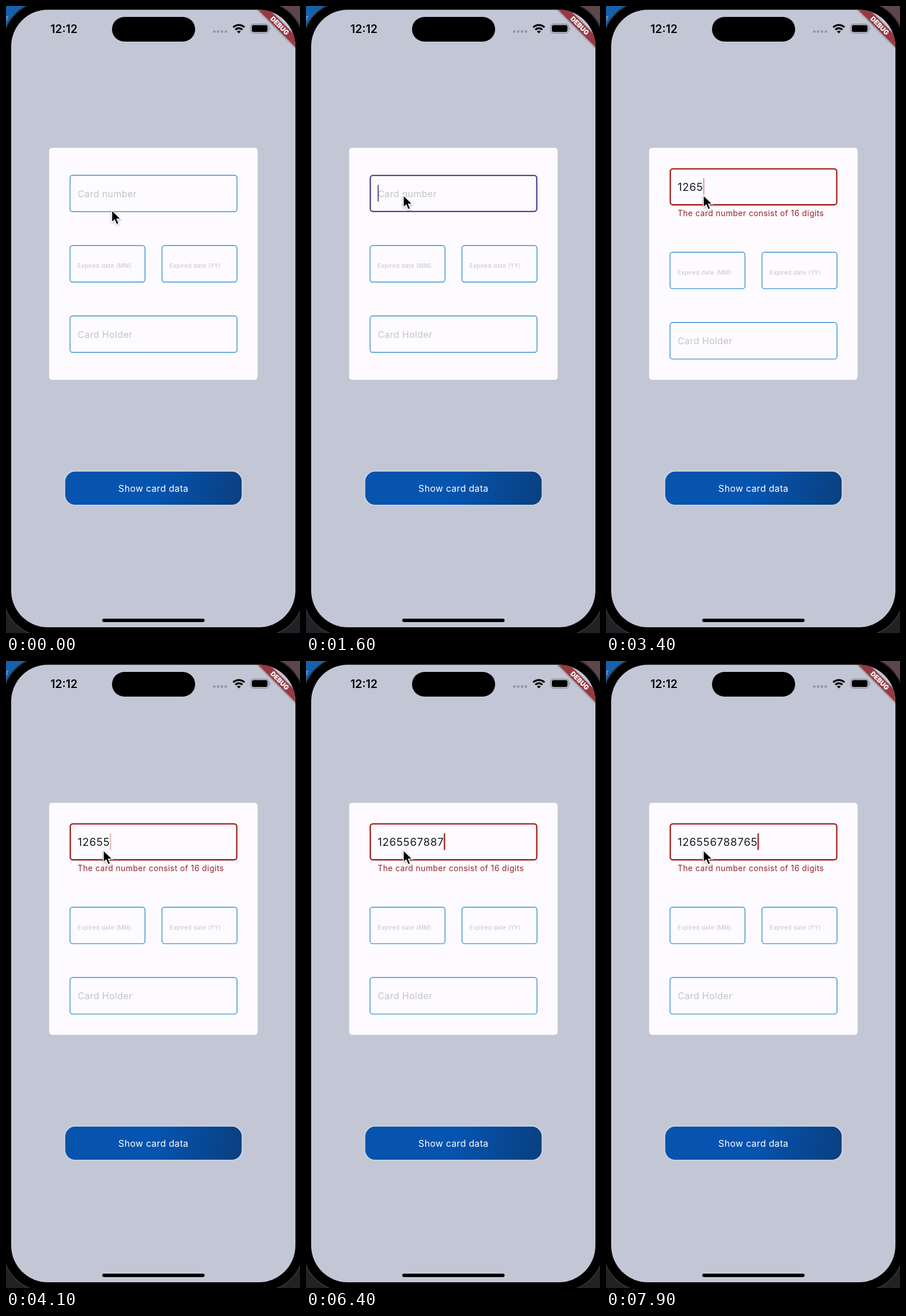
An HTML page for the animation above (8000 ms loop, 513x1092 px).

```html
<!DOCTYPE html>
<html lang="en">
<head>
<meta charset="utf-8">
<title>Card form</title>
<style>
  html, body { margin: 0; width: 100%; height: 100%; overflow: hidden; background: #000; }
  svg { display: block; width: 513px; height: 1092px; font-family: Inter, "Open Sans", sans-serif; }
  .field { fill: none; stroke: #3b8fd1; stroke-width: 1.4; }
  .hint { fill: #c3c2c7; font-size: 16px; letter-spacing: .4px; }
  .small { font-size: 10px; }
  #digits { fill: #1d1b20; font-size: 18.8px; letter-spacing: .68px; }
  #error { fill: #93252a; font-size: 13.9px; letter-spacing: .46px; }
  .label { fill: #fff; font-size: 16px; letter-spacing: .3px; }
  .clock { font-size: 19.6px; font-weight: 600; }
  .debug { fill: #fff; font-size: 11.6px; font-weight: 900; }
</style>
</head>
<body>
<svg viewBox="0 0 513 1092">
  <defs>
    <linearGradient id="blue" gradientUnits="userSpaceOnUse" x1="103" y1="810" x2="412" y2="869">
      <stop offset="0" stop-color="#0754ad"/>
      <stop offset=".5" stop-color="#0554b0"/>
      <stop offset="1" stop-color="#0a3f7f"/>
    </linearGradient>
    <linearGradient id="desk" x2="0" y2="1">
      <stop offset=".03" stop-color="#1561ac"/>
      <stop offset=".1" stop-color="#222226"/>
    </linearGradient>
    <clipPath id="screen"><rect x="9" y="6.5" width="496" height="1075.5" rx="64"/></clipPath>
    <filter id="shadow" x="-30%" y="-50%" width="160%" height="200%">
      <feDropShadow dx="0" dy="1" stdDeviation="1.5" flood-opacity=".4"/>
    </filter>
  </defs>

  <!-- Desktop and phone body -->
  <rect width="513" height="1092" fill="url(#desk)"/>
  <rect x="440" width="73" height="70" fill="#5e464f"/>
  <text x="0" y="25" font-size="13" fill="#8fb0d0">r</text>
  <rect x="-5" y="-7" width="524" height="1104" rx="72" stroke="#333336" stroke-width="2"/>

  <g clip-path="url(#screen)">
    <rect width="513" height="1092" fill="#c3c7d5"/>
    <g transform="translate(505.4 6.5) rotate(45)">
      <rect x="-48" y="32.3" width="96" height="13.9" fill="#983740" filter="url(#shadow)"/>
      <text class="debug" y="43.4" text-anchor="middle">DEBUG</text>
    </g>
  </g>

  <!-- Status bar -->
  <text class="clock" x="77.5" y="47">12:12</text>
  <rect x="185" y="19" width="145" height="43" rx="21.5"/>
  <path d="M363.5 44.5h21" stroke="#9094a2" stroke-width="4.6" stroke-linecap="round" stroke-dasharray="0 6.7"/>
  <g fill="none" stroke="#000" stroke-width="3.3">
    <path d="M396.5 37.2a13.8 13.8 0 0 1 19.6 0M400.2 41.3a8.6 8.6 0 0 1 12.2 0"/>
    <path d="M406.3 47.8l-3.4-3.5a4.8 4.8 0 0 1 6.8 0z" fill="#000" stroke="none"/>
  </g>
  <rect x="427" y="31.3" width="31.4" height="16" rx="5" fill="none" stroke="#858997" stroke-width="1.2"/>
  <rect x="429" y="33.3" width="27.3" height="12" rx="3.3"/>
  <path d="M459.8 36.8q3 2.5 0 5z" fill="#858997"/>
  <rect x="168" y="1067" width="178.5" height="6" rx="3"/>

  <!-- Form -->
  <rect x="75.3" y="247" width="363.7" height="404" rx="5" fill="#fdfbff"/>
  <g id="number">
    <rect id="box" class="field" x="111.7" y="294.7" width="291.4" height="63.6" rx="4.5"/>
    <text id="hint" class="hint" x="125" y="332.8">Card number</text>
    <text id="digits" x="125" y="333.8"></text>
    <rect id="caret" y="311.6" width="2.3" height="29.4" rx="1"/>
    <text id="error" x="125" y="377.6">The card number consist of 16 digits</text>
  </g>
  <g id="rest">
    <rect class="field" x="111.7" y="417.2" width="130.8" height="63.6" rx="4.5"/>
    <text class="hint small" x="125" y="456">Expired date (MM)</text>
    <rect class="field" x="272.2" y="417.2" width="130.9" height="63.6" rx="4.5"/>
    <text class="hint small" x="285.5" y="456">Expired date (YY)</text>
    <rect class="field" x="111.7" y="539.7" width="291.4" height="63.6" rx="4.5"/>
    <text class="hint" x="125" y="577.6">Card Holder</text>
  </g>

  <rect x="102.7" y="810.2" width="309.2" height="59.2" rx="18" fill="url(#blue)" stroke="#dfe4f0" stroke-width="1.2"/>
  <text class="label" x="257.2" y="845.6" text-anchor="middle">Show card data</text>

  <path id="mouse" d="M0 0V21.6l5-4.6 3.4 8 4-1.7-3.4-7.8h7z" stroke="#fff" stroke-width="1.5" filter="url(#shadow)"/>
</svg>
<script>
const LOOP = 8000, FOCUS = 400, SHIFT = 11.6;
const NUMBER = "126556788765";
const KEYS = [1700, 1900, 2100, 2300, 3425, 4400, 4700, 4950, 5700, 6200, 7100, 7650];
const $ = id => document.getElementById(id);
const set = (id, attrs) => {
  for (const key in attrs) $(id).setAttribute(key, attrs[key]);
};
const clamp = v => Math.min(1, Math.max(0, v));

// Solid for half a second, then fades out and back in
function blink(age) {
  const phase = age % 1000;
  if (phase >= 500) return clamp(1 - (phase - 500) / 250);
  return age < 1000 ? 1 : clamp(phase / 250);
}

function draw(t) {
  const typed = KEYS.filter(k => k <= t).length;
  const focused = t >= FOCUS, invalid = typed > 0;
  const inset = focused ? .45 : 0;

  set("box", {
    x: 111.7 + inset, y: 294.7 + inset, width: 291.4 - 2 * inset, height: 63.6 - 2 * inset,
    style: focused ? `stroke:${invalid ? "#a11d17" : "#51418f"};stroke-width:2.3` : ""
  });
  set("number", { transform: `translate(0 ${invalid ? -SHIFT : 0})` });
  set("rest", { transform: `translate(0 ${invalid ? SHIFT : 0})` });
  set("hint", { opacity: invalid ? 0 : 1 });

  const shown = clamp((t - KEYS[0]) / 167);
  set("error", { opacity: shown, transform: `translate(0 ${-4 * (1 - shown)})` });

  $("digits").textContent = NUMBER.slice(0, typed);
  set("caret", {
    x: 124.8 + (typed ? $("digits").getComputedTextLength() : 0),
    fill: invalid ? "#a11d17" : "#51418f",
    opacity: focused ? blink(t - (typed ? KEYS[typed - 1] : FOCUS)) : 0
  });

  const p = clamp((t - 100) / 250), ease = p * p * (3 - 2 * p);
  set("mouse", { transform: `translate(${184.5 - 14.7 * ease} ${355.5 - 26 * ease})` });
}

const start = performance.now();
(function tick() {
  draw((performance.now() - start) % LOOP);
  requestAnimationFrame(tick);
})();
</script>
</body>
</html>
```
